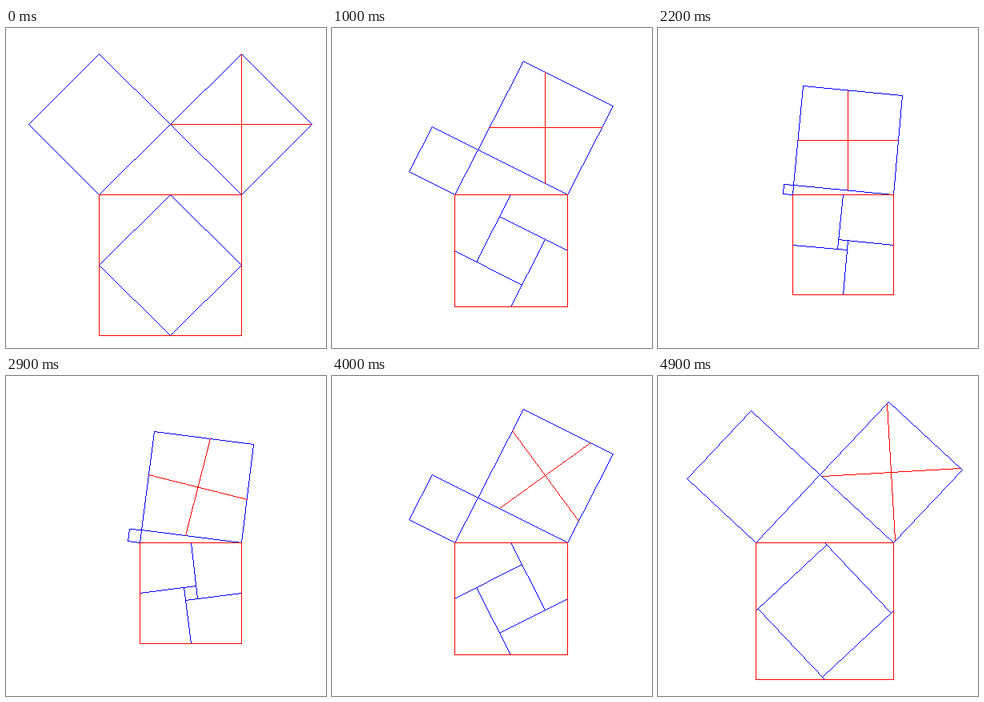
These frames come from a looping animation (400x400 px, 5 s). An HTML page with a canvas:

```html
<!DOCTYPE html>
<html lang="en">
<head>
<meta charset="utf-8">
<title>Dissection of the squares on a right triangle</title>
<style>
  html, body { margin: 0; width: 100%; height: 100%; overflow: hidden; background: #fff; }
  canvas { display: block; width: 400px; height: 400px; image-rendering: pixelated; }
</style>
</head>
<body>
<canvas id="stage" width="400" height="400"></canvas>
<script>
const ctx = document.getElementById('stage').getContext('2d');
const RED = '#ff0000', BLUE = '#0000ff';
const STEP = 100, COUNT = 50;

// Math units have the long leg as 1 and the origin at the right end of the hypotenuse; y points down.
const toPixel = ([x, y]) => [Math.round(293.7 + 125.37 * x), Math.round(208.1 + 124.5 * y)];
const add = ([x, y], [dx, dy], k = 1) => [x + dx * k, y + dy * k];

// One-pixel line without smoothing
function line(p, q) {
  let [x, y] = toPixel(p);
  const [endX, endY] = toPixel(q);
  const dx = Math.abs(endX - x), dy = -Math.abs(endY - y);
  const sx = x < endX ? 1 : -1, sy = y < endY ? 1 : -1;
  let err = dx + dy;
  for (;;) {
    ctx.fillRect(x, y, 1, 1);
    if (x === endX && y === endY) return;
    const e2 = 2 * err;
    if (e2 >= dy) { err += dy; x += sx; }
    if (e2 <= dx) { err += dx; y += sy; }
  }
}

function polygon(points) {
  points.forEach((p, i) => line(p, points[(i + 1) % points.length]));
}

function draw(index) {
  const back = index >= COUNT / 2;
  const angle = Math.PI / 4 * Math.abs(1 - 2 * index / COUNT);
  const sin = Math.sin(angle), cos = Math.cos(angle);
  const shortLeg = Math.tan(angle), hyp = 1 / cos;

  const right = [0, 0], left = [-hyp, 0];
  const along = [-cos, -sin], out = [sin, -cos];
  const apex = along;

  ctx.fillStyle = '#fff';
  ctx.fillRect(0, 0, 400, 400);

  ctx.fillStyle = BLUE;
  polygon([right, apex, add(apex, out), out]);
  polygon([left, apex, add(apex, along, shortLeg), add(left, along, shortLeg)]);

  // Cuts run from the middle of each side of the large square.
  const reach = (1 + shortLeg) / 2;
  const flip = back ? -1 : 1;
  const center = [-hyp / 2, hyp / 2];
  const cuts = [
    [[0, -1], [-sin * flip, cos]],
    [[1, 0], [-cos, -sin * flip]],
    [[0, 1], [sin * flip, -cos]],
    [[-1, 0], [cos, sin * flip]]
  ];
  for (const [side, dir] of cuts) {
    const mid = add(center, side, hyp / 2);
    line(mid, add(mid, dir, reach));
  }

  ctx.fillStyle = RED;
  polygon([left, right, [0, hyp], [-hyp, hyp]]);

  // Cross through the center of the square on the long leg
  const hub = [(sin - cos) / 2, -(sin + cos) / 2];
  const tilt = back ? Math.PI / 2 - 2 * angle : 0;
  for (const a of [tilt, tilt + Math.PI / 2]) {
    const dir = [Math.cos(a), -Math.sin(a)];
    line(add(hub, dir, -hyp / 2), add(hub, dir, hyp / 2));
  }
}

const start = performance.now();
let shown = -1;
function tick() {
  const index = Math.floor((performance.now() - start) / STEP) % COUNT;
  if (index !== shown) draw(shown = index);
  requestAnimationFrame(tick);
}
tick();
</script>
</body>
</html>
```
